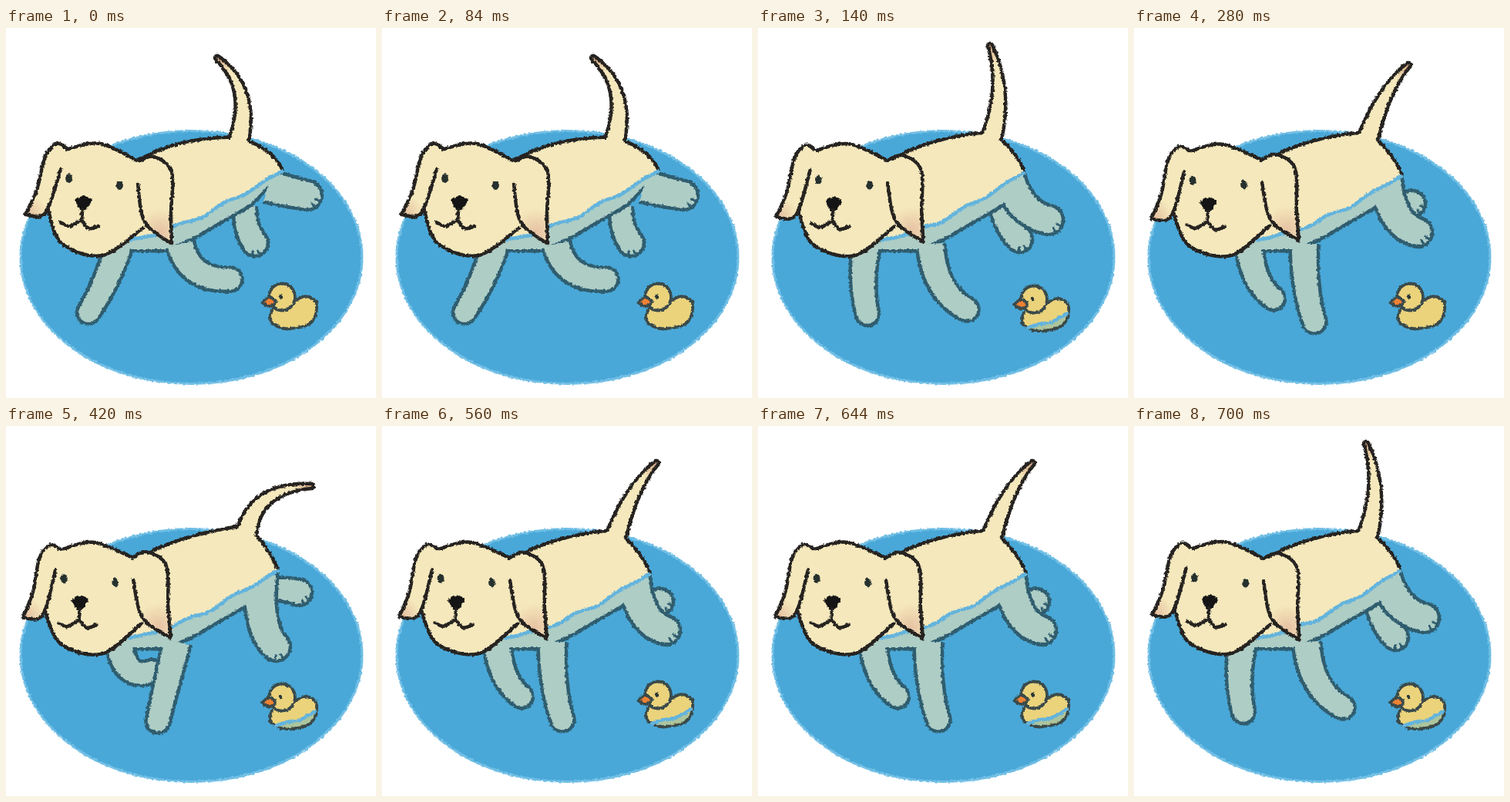
An HTML page for the animation above (840 ms loop, 480 px wide and 480 px high).

```html
<!DOCTYPE html>
<html lang="en">
<head>
<meta charset="utf-8">
<title>Paddling puppy</title>
<style>
html, body { margin: 0; width: 100%; height: 100%; overflow: hidden; background: #fff; }
svg { display: block; width: 100%; height: 100%; }
path { fill: none; stroke-width: 4.5; stroke-linecap: round; stroke-linejoin: round; }
.ink { stroke: #262320; }
.wet { stroke: #2f5d6f; }
.rim { stroke-width: 9; stroke-linecap: butt; }
.ripple { stroke: #63b4dd; }
.toe { stroke: #2f5d6f; stroke-width: 3; }
.duck { stroke: #3a4a4a; stroke-width: 3.8; }
</style>
</head>
<body>
<svg viewBox="0 0 480 480">
  <filter id="crayon" filterUnits="userSpaceOnUse" x="0" y="0" width="480" height="480" color-interpolation-filters="sRGB">
    <feTurbulence type="fractalNoise" baseFrequency=".3" numOctaves="2" seed="4"/>
    <feDisplacementMap in="SourceGraphic" scale="4" xChannelSelector="R" yChannelSelector="G"/>
    <feGaussianBlur stdDeviation=".4"/>
  </filter>
  <g filter="url(#crayon)">
    <ellipse cx="240.5" cy="297.5" rx="221.5" ry="164" fill="#49a8d8" stroke="#72bfe5" stroke-width="3"/>
    <g id="scene"></g>
  </g>
</svg>
<script>
const CREAM = '#f5e8bc', WET = '#aecdc5', YELLOW = '#ebd37c';
const HOLD = 140, STEPS = 6, RIM = 2.25;

// Each limb is a Bezier centre line from joint to paw.
const poses = [
  { rump: [358, 186], base: [300, 144], tip: [274, 39],
    hindNear: [[340, 205], [365, 212], [391, 217]], hindFar: [[312, 228], [306, 255], [323, 279]],
    foreNear: [[226, 280], [237, 328], [291, 326]], foreFar: [[147, 280], [132, 330], [107, 369]] },
  { rump: [345, 188], base: [302, 137], tip: [301, 23],
    hindNear: [[324, 190], [338, 241], [377, 249]], hindFar: [[314, 232], [322, 258], [339, 274]],
    foreNear: [[224, 280], [228, 342], [271, 365]], foreFar: [[141, 280], [132, 330], [142, 371]] },
  { rump: [347, 192], base: [303, 137], tip: [356, 48],
    hindNear: [[326, 195], [333, 255], [368, 265]], hindFar: [[340, 225], [352, 228], [361, 228]],
    foreNear: [[221, 280], [220, 340], [234, 381]], foreFar: [[149, 280], [153, 330], [181, 351]] },
  { rump: [352, 188], base: [312, 131], tip: [396, 78],
    hindNear: [[331, 192], [325, 262], [350, 286]], hindFar: [[342, 212], [365, 211], [380, 216]],
    foreNear: [[222, 280], [208, 335], [197, 383]], foreFar: [[147, 280], [153, 332], [190, 318]] }
];

const mix = (a, b, t) => a + (b - a) * t;
const polar = ([x, y], r, a) => [x + r * Math.cos(a), y + r * Math.sin(a)];
const heading = (p, q) => Math.atan2(q[1] - p[1], q[0] - p[0]);
const path = points => 'M' + points.join('L');

// De Casteljau evaluation for any number of control points.
function bezier(points, t) {
  while (points.length > 1) {
    points = points.slice(1).map((p, i) => p.map((v, k) => mix(points[i][k], v, t)));
  }
  return points[0];
}

const trace = (points, n = 24) => Array.from({ length: n + 1 }, (_, i) => bezier(points, i / n));

// Outline of a tapering limb with a round end, measured inside its rim.
function tube(points, startWidth, endWidth) {
  const left = [], right = [], cap = [], quarter = Math.PI / 2;
  const end = points[points.length - 1], endAngle = heading(points[points.length - 2], end);
  for (let t = 0; t <= 1; t += 1 / 16) {
    const p = bezier(points, t), a = heading(p, bezier(points, t + .01));
    const r = mix(startWidth, endWidth, t) / 2 - RIM;
    left.push(polar(p, r, a - quarter));
    right.unshift(polar(p, r, a + quarter));
  }
  for (let a = -quarter; a < quarter; a += .2) cap.push(polar(end, endWidth / 2 - RIM, endAngle + a));
  return path([...left, ...cap, ...right]);
}

// Smooth spline through "x,y" points; a slash marks a corner.
function curve(text) {
  let last = null, d = '';
  for (const run of text.split('/')) {
    const p = run.trim().split(' ').map(s => s.split(',').map(Number));
    if (last) p.unshift(last);
    else d = 'M' + p[0];
    for (let i = 0; i < p.length - 1; i++) {
      const a = p[i], b = p[i + 1], before = p[i - 1] || a, after = p[i + 2] || b;
      const c1 = a.map((v, k) => v + (b[k] - before[k]) / 6);
      const c2 = b.map((v, k) => v - (after[k] - a[k]) / 6);
      d += `C${c1} ${c2} ${b}`;
    }
    last = p[p.length - 1];
  }
  return d;
}

const stroke = (d, kind) => `<path class="${kind}" d="${d}"/>`;
const fill = (d, color) => `<path style="fill:${color}" d="${d}Z"/>`;
const shape = (d, color, kind) => fill(d, color) + stroke(d, kind);
const oval = (x, y, rx, ry, color, kind = '') =>
  `<ellipse class="${kind}" cx="${x}" cy="${y}" rx="${rx}" ry="${ry}" fill="${color}"/>`;
const blush = (id, [x, y], r, color) =>
  `<radialGradient id="${id}" gradientUnits="userSpaceOnUse" cx="${x}" cy="${y}" r="${r}">
    <stop stop-color="${color}"/><stop offset="1" stop-color="${CREAM}"/></radialGradient>`;

// Rims first, then fills, so overlapping parts merge into one silhouette.
const merge = (parts, color, kind) =>
  parts.map(d => stroke(d, kind + ' rim')).join('') + parts.map(d => fill(d, color)).join('');

function toes(leg, width) {
  const paw = leg[2], angle = heading(leg[1], paw);
  return [.25, .85].map(spread => stroke(
    path([.62, .95].map(k => polar(paw, k * width / 2, angle + spread))), 'toe')).join('');
}

function body(pose, index) {
  const { rump, base, tip } = pose;
  const [x, y] = rump;
  const drop = 328 - 16 * index;
  const water = trace([rump, [x - 44, y + 25], [235, 263], [160, 275]])
    .map(([px, py], i) => [px, py - 2.5 * Math.sin((px - drop) / 9.5) * Math.sin(Math.PI * i / 24)]);
  const back = [...trace([[172, 174], [225, 143], base]), ...trace([base, [x - 12, y - 28], [x - 1, y]])];
  const belly = [rump, [317, 228], [241, 272], [206, 287], [135, 287]];
  const torso = path([...belly, ...[...water].reverse()]);
  const tail = tube([[base[0], base[1] + 8], [323, 80], tip], 27, 6);
  const hindFar = tube(pose.hindFar, 29, 34), hindNear = tube(pose.hindNear, 43, 38);
  const foreFar = tube(pose.foreFar, 37, 30), foreNear = tube(pose.foreNear, 37, 31);
  return blush('tail', tip, 24, '#d3a581')
    + merge([hindFar], WET, 'wet') + toes(pose.hindFar, 34)
    + stroke(path(belly), 'wet rim') + merge([foreFar], WET, 'wet')
    + stroke(hindNear, 'wet rim') + stroke(foreNear, 'wet rim')
    + [torso, hindNear, foreNear].map(d => fill(d, WET)).join('') + toes(pose.hindNear, 38)
    + stroke(path(back), 'ink rim') + stroke(tail, 'ink rim')
    + fill(path([...back, ...water]), CREAM) + fill(tail, 'url(#tail)')
    + stroke(path(water), 'ripple');
}

function head(index) {
  const turn = -3.5 * Math.sin(index * Math.PI / 6);
  const crown = curve('80,157 122,150 172,173');
  const chin = curve('54,234 72,279 125,295 178,259');
  const leftEar = curve('80,157 66,150 51,167 40,210 25,242 / 51,240 71,183');
  const rightEar = curve('172,173 192,167 215,187 214,240 215,280 / 180,252 171,202');
  return `<g transform="translate(0 ${-turn * .3}) rotate(${turn} 114 297)">`
    + blush('leftTip', [28, 242], 26, '#e3bd9e') + blush('rightTip', [200, 264], 30, '#e6c2a3')
    + oval(116, 222, 60, 70, CREAM)
    + fill(crown + 'L178,259L54,234', CREAM) + fill(chin, CREAM)
    + fill(leftEar, 'url(#leftTip)')
    + [chin, crown, leftEar].map(d => stroke(d, 'ink')).join('')
    + shape(rightEar, 'url(#rightTip)', 'ink')
    + oval(81.5, 195, 4.4, 6, '#26312e') + oval(147.5, 204, 4.4, 6, '#26312e')
    + fill(curve('89,223 100,218 111,224 99,238 89,223'), '#151515')
    + stroke(curve('99,236 98,250'), 'ink')
    + stroke(curve('71,252 82,257 98,249 / 107,260 120,257'), 'ink')
    + '</g>';
}

function duck(step) {
  const low = step % 2;
  const hull = curve('345,366 343,380 362,390 395,383 403,358 390,348 374,354');
  const ripple = curve('350,386 365,381 380,379 401,367');
  const wet = low || step === 4;
  return `<g transform="translate(0 ${low * 3})">`
    + fill(hull, YELLOW)
    + (wet ? fill(ripple + 'L395,383L362,390', '#adc59d') : '')
    + stroke(hull, 'duck')
    + (wet ? stroke(ripple, 'ripple') : '')
    + oval(358, 349, 17, 17.5, YELLOW, 'duck')
    + shape(curve('332,356 342,349 350,356 341,361 332,356'), '#ef8134', 'duck')
    + oval(356.5, 348.5, 2.6, 2.8, '#2b3736') + '</g>';
}

const frames = Array.from({ length: STEPS }, (_, step) => {
  const index = 3 - Math.abs(3 - step);
  return body(poses[index], index) + head(index) + duck(step);
});
const scene = document.getElementById('scene');
const start = performance.now();
let shown = -1;

function draw(now) {
  const step = Math.floor(Math.max(0, now - start) / HOLD) % STEPS;
  if (step !== shown) scene.innerHTML = frames[shown = step];
  requestAnimationFrame(draw);
}
draw(start);
</script>
</body>
</html>
```
